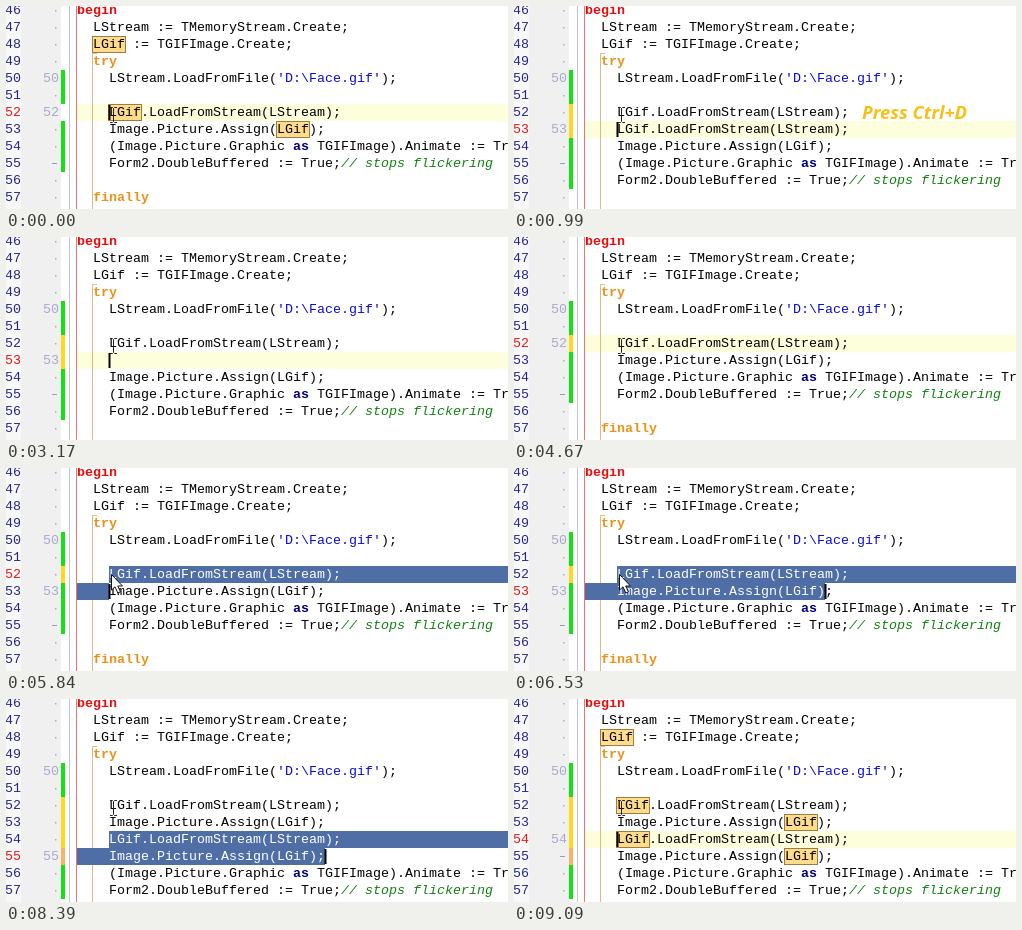
These frames come from a looping animation (502 px wide and 203 px high, 9790 ms). An HTML page:

```html
<!DOCTYPE html>
<html lang="en">
<head>
<meta charset="utf-8">
<title>Duplicate line</title>
<style>
  html, body { margin: 0; width: 100%; height: 100%; overflow: hidden; background: #fff; }
  svg { display: block; width: 502px; height: 203px; }
  text { white-space: pre; font: 13.333px "Liberation Mono", monospace; }
  .begin { fill: #ea0c0c; font-weight: bold; }
  .try, .finally { fill: #e8921c; font-weight: bold; }
  .as { fill: #000080; font-weight: bold; }
  .str { fill: #0a0ae0; }
  .note { fill: #138013; font-style: italic; }
  .tip { fill: #f8c014; font-family: "Open Sans", sans-serif; font-weight: bold; font-style: italic; }
</style>
</head>
<body>
<svg id="stage" viewBox="0 0 502 203"></svg>
<script>
const LOOP = 9790, FIRST = 46, ROW = 17, LEFT = 71, CH = 8;
const stage = document.getElementById('stage');

const load = '    LGif.LoadFromStream(LStream);';
const assign = '    Image.Picture.Assign(LGif);';
const head = ['begin', '  LStream := TMemoryStream.Create;', '  LGif := TGIFImage.Create;', '  try',
  "    LStream.LoadFromFile('D:\\Face.gif');", ''];
const tail = ['    (Image.Picture.Graphic as TGIFImage).Animate := True;',
  '    Form2.DoubleBuffered := True;// stops flickering', '', '  finally'];

const body = {
  plain: [load, assign], twice: [load, load, assign],
  blank: [load, '', assign], block: [load, assign, load, assign]
};
// change bars for rows 50 onward: g saved, y edited, o edited last
const bars = { fresh: 'gg ggg', edited: 'ggyggg', line: 'ggyyggg', block: 'ggyyyogg' };

// Each step keeps the previous state and overrides some of it.
// caret: [row, column]; sel: [row, from, to] spans; tip: [x, baseline, size]
const tipA = [348, 113, 18.4], tipB = [397, 91.5, 15.7];
const whole = row => [row, 4, 99];
const steps = [
  [0, { body: 'plain', bar: 'fresh', cur: 52, red: 52, marks: 1, caret: [52, 4], sel: [], tip: tipA, fade: 0, arrow: 0, icons: 0 }],
  [690, { marks: 0, fade: 1 }],
  [990, { body: 'twice', bar: 'line', cur: 53, red: 53, caret: [53, 4] }],
  [1540, { marks: 1 }],
  [1690, { caret: 0 }],
  [1780, { caret: [53, 4] }],
  [2320, { marks: 0, fade: .66 }],
  [2400, { fade: .33 }],
  [2470, { fade: 0, caret: [53, 33] }],
  [2700, { caret: [53, 23] }],
  [2930, { caret: [53, 4] }],
  [3100, { sel: [[53, 4, 33]], icons: 1 }],
  [3170, { body: 'blank', sel: [], icons: 0 }],
  [3880, { cur: 52, red: 52, caret: [52, 33] }],
  [4030, { body: 'plain', bar: 'edited' }],
  [4670, { caret: 0 }],
  [4740, { caret: [52, 23] }],
  [5140, { caret: [52, 9] }],
  [5290, { caret: [52, 4] }],
  [5840, { sel: [whole(52), [53, 0, 4]], cur: 53, caret: [53, 4], arrow: 1 }],
  [5920, { red: 53 }],
  [6150, { sel: [whole(52), [53, 0, 10]], caret: [53, 10] }],
  [6300, { sel: [whole(52), [53, 0, 18]], caret: [53, 18] }],
  [6530, { sel: [whole(52), [53, 0, 30]], caret: [53, 30] }],
  [6910, { sel: [whole(52), [53, 0, 31]], caret: [53, 31], tip: tipB, fade: .5, icons: 2 }],
  [6990, { fade: 1 }],
  [7390, { caret: 0 }],
  [7460, { caret: [53, 31] }],
  [7860, { body: 'block', bar: 'block', icons: 0, cur: 55, caret: [55, 31], sel: [whole(54), [55, 0, 31]], arrow: 0 }],
  [8390, { red: 55, fade: 0 }],
  [8560, { cur: 54, red: 54, caret: [54, 4], sel: [] }],
  [9090, { marks: 1 }]
];
const states = [];
steps.forEach(([, change], i) => states.push({ ...states[i - 1], ...change }));

const rowY = row => (row - FIRST) * ROW - 4;
const colX = col => LEFT + col * CH;
const rect = (x, y, w, h, fill, more = '') =>
  `<rect x="${x}" y="${y}" width="${w}" height="${h}" fill="${fill}" ${more}/>`;
const text = (x, y, str, more = '') => `<text x="${x}" y="${y}" ${more}>${str}</text>`;

function colour(line) {
  return line.replace(/\/\/.*|'[^']*'|\b(begin|try|finally|as)\b/g, (m, word) =>
    `<tspan class="${word || (m[0] === '/' ? 'note' : 'str')}">${m}</tspan>`);
}

function gutter(s) {
  let out = rect(0, 0, 15, 203, '#f8f8f8') + rect(15, 0, 40, 203, '#f0f0f0') +
    rect(63, 0, 1, 203, '#c4c4c8');
  for (let row = FIRST; row < FIRST + 12; row++) {
    const y = rowY(row);
    out += text(-1, y + 12, row, `fill="${row === s.red ? '#e81818' : '#26268c'}"`);
    if (row === s.cur || row % 10 === 0) out += text(37, y + 12, row, 'fill="#a9a9cc"');
    else if (row % 5 === 0) out += rect(46, y + 8, 5, 1, '#9c9cb8');
    else out += rect(49, y + 8, 1.5, 1.5, '#a9a9c0');
  }
  const tint = { g: '#16e016', y: '#ffd91f', o: '#f7b469' };
  [...bars[s.bar]].forEach((c, i) => { if (tint[c]) out += rect(55, rowY(50 + i), 4, ROW, tint[c]); });
  return out;
}

function icons(n) {
  const bolt = '<path d="M7 3L14 3L10.500 7.500H14L5 15.500L8 10.500H3.500Z" fill="#ffe9a8" stroke="#111"/>';
  const pens = '<g stroke="#333" stroke-width=".9"><path d="M3 9L9 3L12 5L6 12Z" fill="#fff"/>' +
    '<path d="M8 13L14 6L17 9L10 16Z" fill="#f3b878"/></g>';
  let out = '';
  if (n > 1) out += `<g transform="translate(18 91)">${rect(.5, .5, 18, 18, '#fff', 'stroke="#20264c"')}${bolt}</g>`;
  if (n) out += `<g transform="translate(18 113)">${rect(0, 0, 19, 19, '#d8e8f6')}${pens}</g>`;
  return out;
}

function draw(s) {
  const lines = [...head, ...body[s.body], ...tail].slice(0, 12);
  let out = rect(0, 0, 502, 203, '#fff') + gutter(s);
  if (!s.sel.length) out += rect(LEFT, rowY(s.red), 502 - LEFT, ROW, '#fcfedc');
  out += '<path d="M70.500 0V203" stroke="#ee7474"/>' +
    '<path d="M91 47.500H86.500V203" fill="none" stroke="#dfb884"/>';

  if (s.marks) lines.forEach((line, i) => {
    const col = line.indexOf('LGif');
    if (col >= 0) out += rect(colX(col) - .5, rowY(FIRST + i) + .5, 33, 16, '#ffdc8c', 'stroke="#a07c3c"');
  });
  lines.forEach((line, i) => { out += text(LEFT, rowY(FIRST + i) + 12, colour(line)); });

  s.sel.forEach(([row, from, to], i) => {
    const box = fill => rect(colX(from), rowY(row), (to - from) * CH, ROW, fill);
    out += `<clipPath id="sel${i}">${box('#000')}</clipPath>` + box('#506ea6') +
      text(LEFT, rowY(row) + 12, lines[row - FIRST], `fill="#fff" clip-path="url(#sel${i})"`);
  });
  if (s.caret) out += rect(colX(s.caret[1]) - .5, rowY(s.caret[0]) + 1, 2, 15, '#000');
  out += icons(s.icons);

  const [x, y, size] = s.tip;
  if (s.fade) out += text(x, y, 'Press Ctrl+D', `class="tip" style="font-size:${size}px" opacity="${s.fade}"`);

  out += s.arrow
    ? '<path d="M105.500 106.500V122L109 118.800L111.800 125L114.500 123.800L111.700 118H116.500Z" fill="#fff" stroke="#111"/>'
    : '<path d="M104 101.500H106.500L107.500 102.500L108.500 101.500H111M107.500 102.500V115M104 116.500H106.500L107.500 115.500L108.500 116.500H111" fill="none" stroke="#222"/>';
  stage.innerHTML = out;
}

let shown = -1;
function tick() {
  const t = performance.now() % LOOP;
  const now = steps.findLastIndex(([at]) => at <= t);
  if (now !== shown) draw(states[shown = now]);
  requestAnimationFrame(tick);
}
tick();
</script>
</body>
</html>
```
